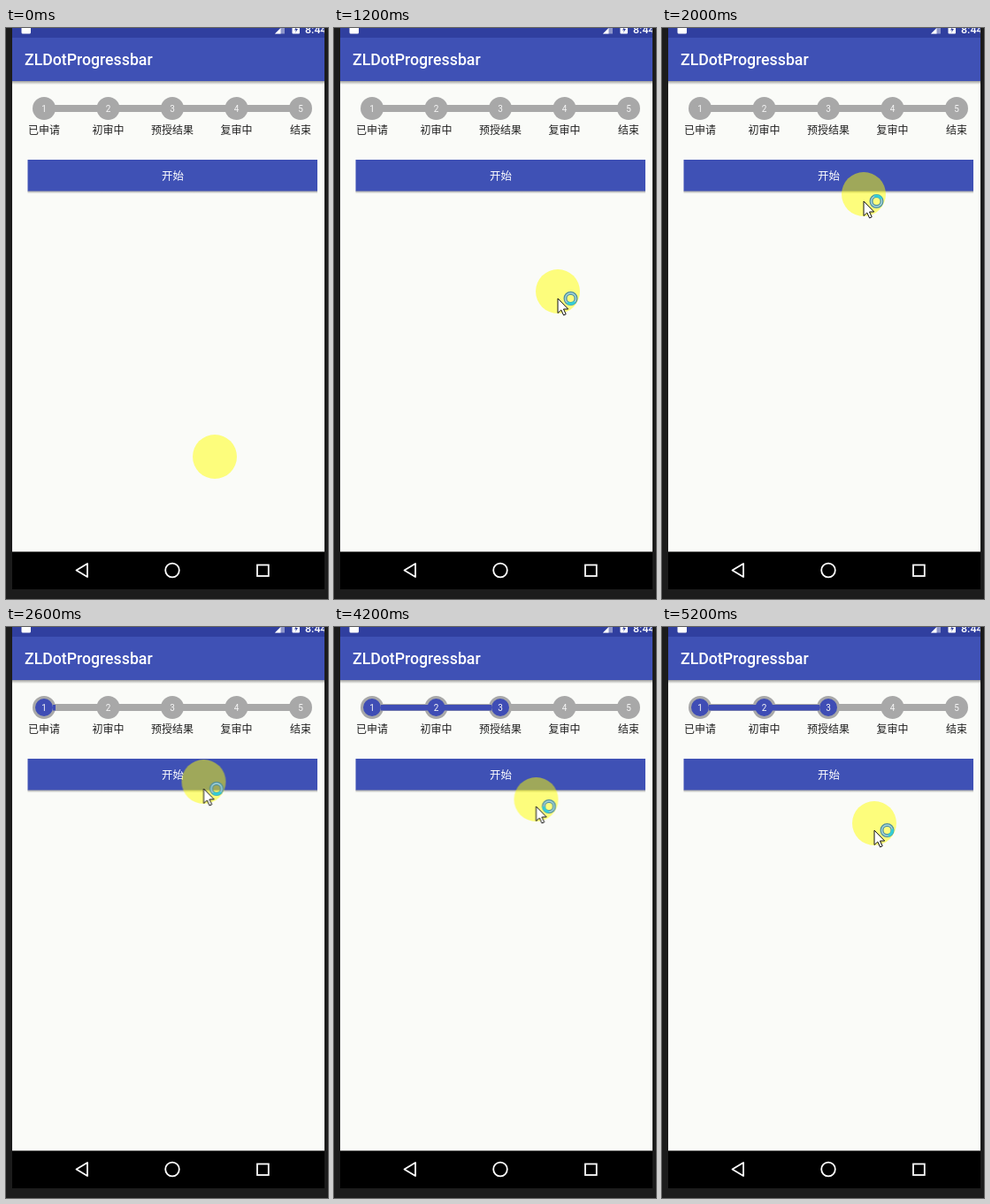
Animation of 364 by 646 pixels, one loop 5600 ms. Source, as an HTML page:

```html
<!DOCTYPE html>
<html lang="zh">
<head>
<meta charset="utf-8">
<title>Dot progress bar</title>
<style>
html, body { margin: 0; width: 100%; height: 100%; overflow: hidden; background: #1c1c1c; }
svg { display: block; width: 364px; height: 646px; }
text { font-family: Roboto, "Noto Sans CJK SC", "Noto Sans CJK", sans-serif; }
.mid { text-anchor: middle; }
.label { font-size: 12px; fill: #222; }
.num { font-size: 10px; fill: #f6f6f6; }
.nav { fill: none; stroke: #fff; stroke-width: 1.8; }

.move, .arrow, .bar, .dot { animation: 5.6s step-end infinite; }
.move { animation-name: move; }
.arrow { animation-name: arrow; }
.bar { animation-name: bar; fill: #3f4db5; }
.dot { fill: #3f4db5; opacity: 0; }
.d1 { animation-name: dot1; }
.d2 { animation-name: dot2; }
.d3 { animation-name: dot3; }
.spin { animation: spin 1.4s steps(7) infinite; }

/* One step is 200 ms, 3.571% of the loop. */
@keyframes move {
  0% { transform: translate(236px, 485px); }
  17.857% { transform: translate(252px, 396px); }
  21.428% { transform: translate(253px, 298px); }
  25% { transform: translate(244px, 242px); }
  28.571% { transform: translate(235px, 210px); }
  32.142% { transform: translate(230px, 194px); }
  35.714% { transform: translate(228px, 188px); }
  39.285% { transform: translate(225px, 179px); }
  42.857% { transform: translate(223.5px, 175px); }
  71.428% { transform: translate(225px, 183px); }
  75% { transform: translate(228.5px, 195px); }
  78.571% { transform: translate(233px, 207px); }
  82.142% { transform: translate(237px, 216px); }
  85.714% { transform: translate(239px, 221px); }
  89.285%, 100% { transform: translate(240px, 222px); }
}
@keyframes arrow { 0% { opacity: 0; } 3.571%, 100% { opacity: 1; } }
@keyframes bar {
  0% { width: 0; }
  46.428% { width: 3px; animation-timing-function: steps(5); }
  64.285%, 100% { width: 125px; }
}
@keyframes dot1 { 0% { opacity: 0; } 46.428%, 100% { opacity: 1; } }
@keyframes dot2 { 0% { opacity: 0; } 57.142%, 100% { opacity: 1; } }
@keyframes dot3 { 0% { opacity: 0; } 67.857%, 100% { opacity: 1; } }
@keyframes spin { to { transform: rotate(360deg); } }
</style>
</head>
<body>
<svg viewBox="0 0 364 646">
  <defs>
    <linearGradient id="shade" x2="0" y2="1">
      <stop offset="0" stop-color="#444" stop-opacity=".5"/>
      <stop offset="1" stop-color="#444" stop-opacity="0"/>
    </linearGradient>
    <clipPath id="app"><rect x="7" width="353" height="635"/></clipPath>
  </defs>

  <rect width="364" height="646" fill="#1c1c1c"/>

  <g clip-path="url(#app)">
    <rect x="7" width="353" height="593" fill="#fafbf8"/>
    <rect x="7" width="353" height="11" fill="#303f9f"/>
    <rect x="7" y="11" width="353" height="49" fill="#3f51b5"/>
    <rect x="7" y="60" width="353" height="4" fill="url(#shade)"/>

    <g fill="#fff">
      <rect x="17.5" y="-5" width="10.5" height="11.5" rx="1.5"/>
      <path d="M304 6.5 L315 -4.5 V6.5Z" opacity=".45"/>
      <path d="M304 6.5 L310.5 0 V6.5Z"/>
      <rect x="323.5" y="-6" width="8.5" height="12.5" rx="1"/>
      <text x="338" y="5.5" font-size="12.5" font-weight="500">8:44</text>
      <text x="21" y="42" font-size="17.7" font-weight="500">ZLDotProgressbar</text>
    </g>
    <path d="M329 -2 L326 2.5 H328 L327 5.5 L330 1 H328Z" fill="#303f9f"/>

    <g fill="#a8a8a8">
      <rect x="43" y="87" width="290" height="8"/>
      <circle cx="43" cy="91" r="13"/>
      <circle cx="115.5" cy="91" r="13"/>
      <circle cx="188" cy="91" r="13"/>
      <circle cx="260.5" cy="91" r="13"/>
      <circle cx="333" cy="91" r="13"/>
    </g>
    <rect class="bar" x="53" y="88" width="0" height="6.5"/>
    <circle class="dot d1" cx="43" cy="91" r="10"/>
    <circle class="dot d2" cx="115.5" cy="91" r="10"/>
    <circle class="dot d3" cx="188" cy="91" r="10"/>
    <g class="mid num">
      <text x="43" y="94.7">1</text>
      <text x="115.5" y="94.7">2</text>
      <text x="188" y="94.7">3</text>
      <text x="260.5" y="94.7">4</text>
      <text x="333" y="94.7">5</text>
    </g>
    <g class="mid label">
      <text x="43" y="120">已申请</text>
      <text x="115.5" y="120">初审中</text>
      <text x="188" y="120">预授结果</text>
      <text x="260.5" y="120">复审中</text>
      <text x="333" y="120">结束</text>
    </g>

    <rect x="24.5" y="184" width="327.5" height="3.5" fill="url(#shade)"/>
    <rect x="24.5" y="149" width="327.5" height="35.5" fill="#3f51b5"/>
    <text class="mid" x="188.5" y="171.5" font-size="12.5" fill="#fff">开始</text>

    <rect x="7" y="592.5" width="353" height="43" fill="#000"/>
    <g class="nav">
      <path d="M79.5 613.5 L92 606 V621Z" stroke-linejoin="round"/>
      <circle cx="188" cy="613.5" r="7.8"/>
      <rect x="284" y="607.5" width="12.8" height="12.5"/>
    </g>

    <g class="move">
      <circle r="25" fill="#ff0" opacity=".5"/>
      <g class="arrow">
        <path d="M0 8 V24.5 L3.8 21 L6.6 27 L9.2 25.8 L6.5 20 H11.7Z" fill="#fff" stroke="#111"/>
        <g transform="translate(14.5 8)" fill="none">
          <circle r="6" stroke="#4f8f9c" stroke-width="4"/>
          <circle r="6" stroke="#a4d4dc" stroke-width="1.5"/>
          <path class="spin" d="M0 6 A6 6 0 0 1 -6 0" stroke="#30d0d8" stroke-width="3"/>
        </g>
      </g>
    </g>
  </g>
</svg>
</body>
</html>
```
